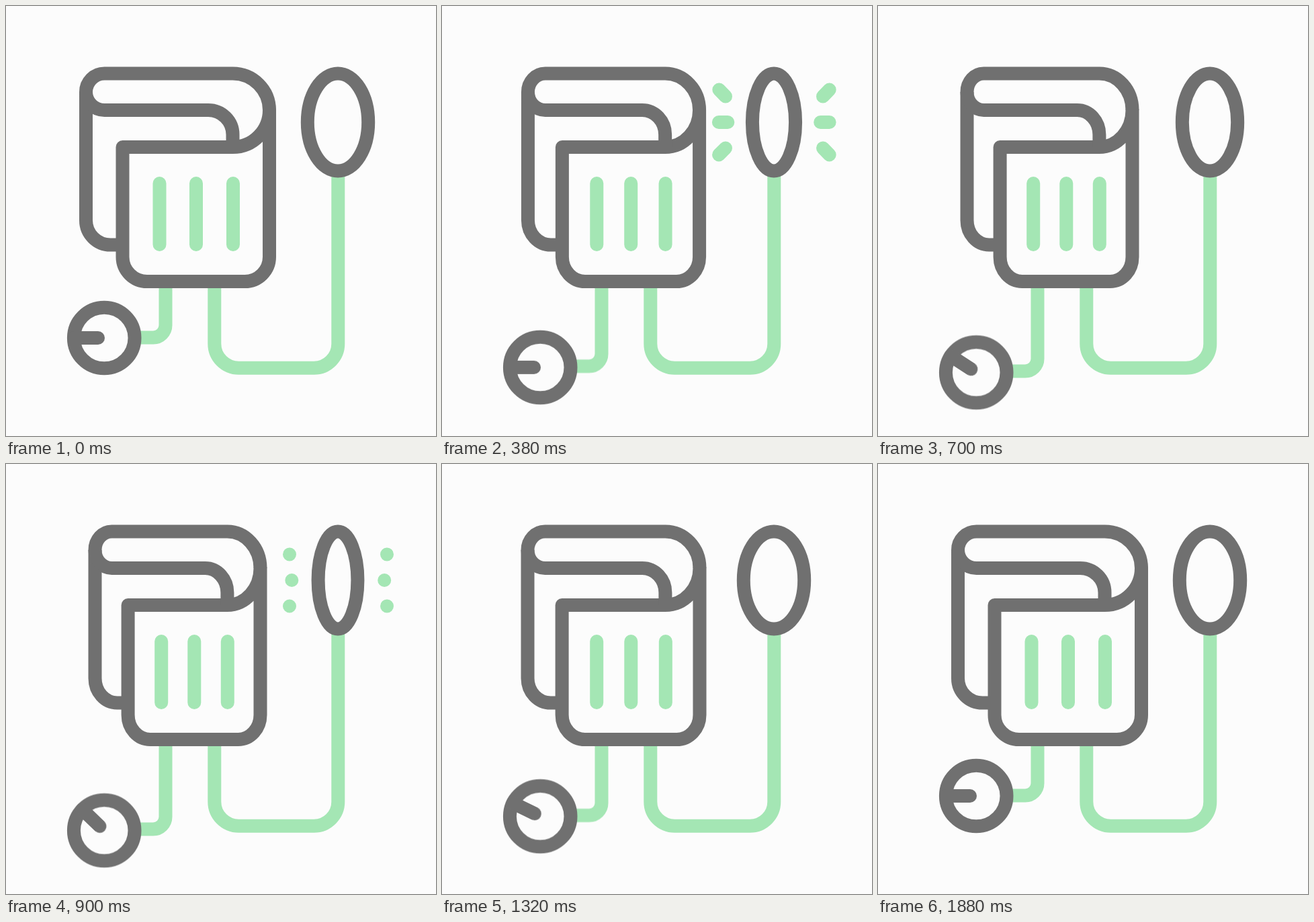
Write an HTML page that moves like this. It is 640x640 px and loops after 2340 ms.

```html
<!DOCTYPE html>
<html lang="en">
<head>
<meta charset="utf-8">
<title>Blood pressure monitor</title>
<style>
  html, body { margin: 0; height: 100%; overflow: hidden; background: #fcfcfc; }
  svg { display: block; width: 100vw; height: 100vh; }

  svg * {
    --ease: cubic-bezier(.364, 0, .636, 1);
    animation-duration: 2340ms;
    animation-iteration-count: infinite;
    animation-timing-function: var(--ease);
  }
  path, ellipse, circle { fill: none; stroke-width: 20; stroke-linejoin: round; }
  .gray { stroke: #707070; }
  .green { stroke: #a4e6b4; }
  .round { stroke-linecap: round; }

  /* Cuff: each outline morphs between its relaxed and tightened shape. */
  .cuff path { d: var(--rest); animation-name: tighten; }
  .front {
    fill: #fcfcfc;
    --rest: path("M392 155V373.5A36.5 36.5 0 0 1 355.5 410H210A36.5 36.5 0 0 1 173.5 373.5V210H337.5A54.5 55 0 0 0 392 155Z");
    --tight: path("M378.5 155V373.5A32.9 36.5 0 0 1 345.6 410H214.5A32.9 36.5 0 0 1 181.6 373.5V210H329.4A49.1 55 0 0 0 378.5 155Z");
  }
  .back {
    --rest: path("M173.5 355.5H155.5A36.5 36.5 0 0 1 119 319V128A27.5 27.5 0 0 1 146.5 100.5H337.5A54.5 54.5 0 0 1 392 155");
    --tight: path("M181.6 355.5H165.4A32.9 36.5 0 0 1 132.5 319V128A24.8 27.5 0 0 1 157.3 100.5H329.4A49.1 54.5 0 0 1 378.5 155");
  }
  .fold {
    --rest: path("M119 128A27.5 27 0 0 0 146.5 155H301A36.5 36.5 0 0 1 337.5 191.5V210");
    --tight: path("M132.5 128A24.8 27 0 0 0 157.3 155H296.5A32.9 36.5 0 0 1 329.4 191.5V210");
  }
  .bars {
    --rest: path("M228.5 264V355M283 264V355M338 264V355");
    --tight: path("M231.2 264V355M280.3 264V355M329.8 264V355");
  }
  @keyframes tighten {
    0%, 76.92%, 100% { d: var(--rest); }
    26.92%, 41.88% { d: var(--tight); }
  }

  .pump { animation-name: squeeze; }
  @keyframes squeeze {
    0%, 25.64%, 51.28%, 100% { rx: 45.2px; }
    12.82%, 38.46% { rx: 29.4px; }
  }

  /* Rays grow outward, then vanish from their inner end. */
  .rays { animation-name: show; animation-timing-function: step-end; }
  .rays path { stroke-dasharray: 1 3; animation-name: shoot; }
  @keyframes show {
    0%, 25.64%, 51.28%, 100% { opacity: 0; }
    12.82%, 38.46% { opacity: 1; }
  }
  @keyframes shoot {
    0%, 12.82% { stroke-dashoffset: 1; }
    19.66% { stroke-dashoffset: 0; }
    25.64% { stroke-dashoffset: -1; animation-timing-function: step-end; }
    25.65%, 38.46% { stroke-dashoffset: 1; }
    45.3% { stroke-dashoffset: 0; }
    51.28%, 100% { stroke-dashoffset: -1; }
  }

  .dial, .hose { animation-name: drop; }
  .dial { --drop: 51.4px; }
  .hose { --drop: 50px; }
  @keyframes drop {
    0%, 68.38%, 100% { transform: translateY(0); }
    21.71%, 47.01% { transform: translateY(var(--drop)); }
  }

  .needle { transform-origin: 146px 494px; animation-name: turn; }
  @keyframes turn {
    0%, 21.37%, 68.38%, 100% { transform: rotate(0deg); }
    34.19%, 47.01% { transform: rotate(44deg); }
  }
</style>
</head>
<body>
<svg viewBox="0 0 640 640">
  <g class="rays green round">
    <path pathLength="1" d="M422 134.5L403 115"/>
    <path pathLength="1" d="M425.3 173H399"/>
    <path pathLength="1" d="M422 211.5L402.5 231"/>
    <path pathLength="1" d="M567 134.5L586 115"/>
    <path pathLength="1" d="M563.2 173H589.5"/>
    <path pathLength="1" d="M567 211.5L586 231"/>
  </g>

  <path class="green" d="M494.3 246V502.5A36 36 0 0 1 458.3 538.7H346.5A36 36 0 0 1 310.3 502.5V405"/>
  <path class="green hose" d="M237.5 350V475A18.5 18.5 0 0 1 219 493.5H192"/>

  <g class="cuff">
    <path class="gray front"/>
    <path class="gray back"/>
    <path class="gray fold"/>
    <path class="green round bars"/>
  </g>

  <ellipse class="gray pump" cx="494" cy="173" rx="45.2" ry="72.5"/>

  <g class="dial">
    <circle class="gray" cx="146.2" cy="494" r="45.3"/>
    <path class="gray round needle" d="M101 494H137"/>
  </g>
</svg>
</body>
</html>
```
